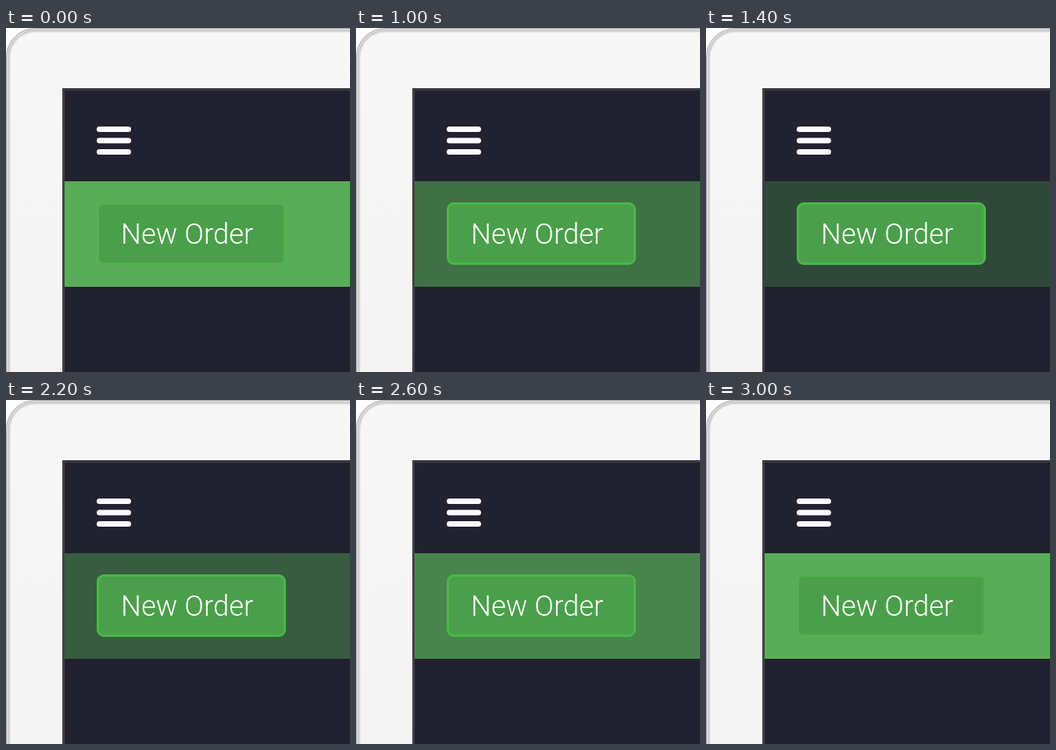
Animation of 440 by 440 pixels, one loop 3.5 s. Source, as an HTML page:

```html
<!DOCTYPE html>
<html lang="en">
<head>
<meta charset="utf-8">
<title>New Order</title>
<style>
  html, body { margin: 0; width: 100%; height: 100%; overflow: hidden; background: #fff; }
  svg { display: block; width: 440px; height: 440px; }
  text { font: 300 36.5px Roboto, "Open Sans", sans-serif; fill: #fff; }
</style>
</head>
<body>
<svg viewBox="0 0 440 440">
  <defs>
    <linearGradient id="shell" x2="0" y2="1">
      <stop stop-color="#f7f7f7"/>
      <stop offset="1" stop-color="#f3f3f3"/>
    </linearGradient>
  </defs>

  <!-- Tablet shell -->
  <rect x=".5" y=".5" width="500" height="500" rx="37" fill="#dedede" stroke="#a6a6a6"/>
  <rect x="3" y="3" width="500" height="500" rx="34.5" fill="#d8d8d8" stroke="#c2c2c2"/>
  <rect x="5.5" y="5.5" width="500" height="500" rx="32" fill="url(#shell)" stroke="#e8e8e8"/>

  <!-- Screen -->
  <rect x="72" y="77" width="400" height="400" rx="2" fill="#414145"/>
  <rect x="72" y="77" width="400" height="2" rx="1" fill="#343438"/>
  <rect x="75" y="80" width="400" height="400" fill="#22212f"/>
  <path d="M119.5 129.5h37m-37 14.5h37m-37 14.5h37" stroke="#fafaff" stroke-width="7" stroke-linecap="round"/>
  <rect id="band" x="75" y="196" width="365" height="135"/>

  <!-- Button -->
  <rect x="118" y="225" width="238" height="76" rx="7" fill="#4b9f4a"/>
  <rect id="edge" fill="none" stroke="#47b947"/>
  <text x="147" y="276">New Order</text>
</svg>
<script>
  const LOOP = 3500, STEP = 200, STEPS = 5;
  const BRIGHT = [89, 173, 89], DIM = [47, 72, 58];
  const band = document.getElementById('band');
  const edge = document.getElementById('edge');

  const stepsSince = (t, start) =>
    Math.max(0, Math.min(STEPS, Math.floor((t - start) / STEP) + 1));

  function setEdge(inset, width, radius) {
    const box = { x: 116 + inset, y: 223 + inset, width: 242 - 2 * inset,
      height: 80 - 2 * inset, rx: radius, 'stroke-width': width };
    for (const key in box) edge.setAttribute(key, box[key]);
  }

  function draw(now) {
    const t = now % LOOP;
    const level = stepsSince(t, 600) - stepsSince(t, 2200);
    const rgb = BRIGHT.map((c, i) => Math.round(c + (DIM[i] - c) * level / STEPS));
    band.setAttribute('fill', `rgb(${rgb})`);
    // The outer part of the edge melts into the band at full brightness.
    if (level) setEdge(1.5, 3, 7.5);
    else setEdge(2.5, 1, 6.5);
    requestAnimationFrame(draw);
  }

  draw(performance.now());
</script>
</body>
</html>
```
